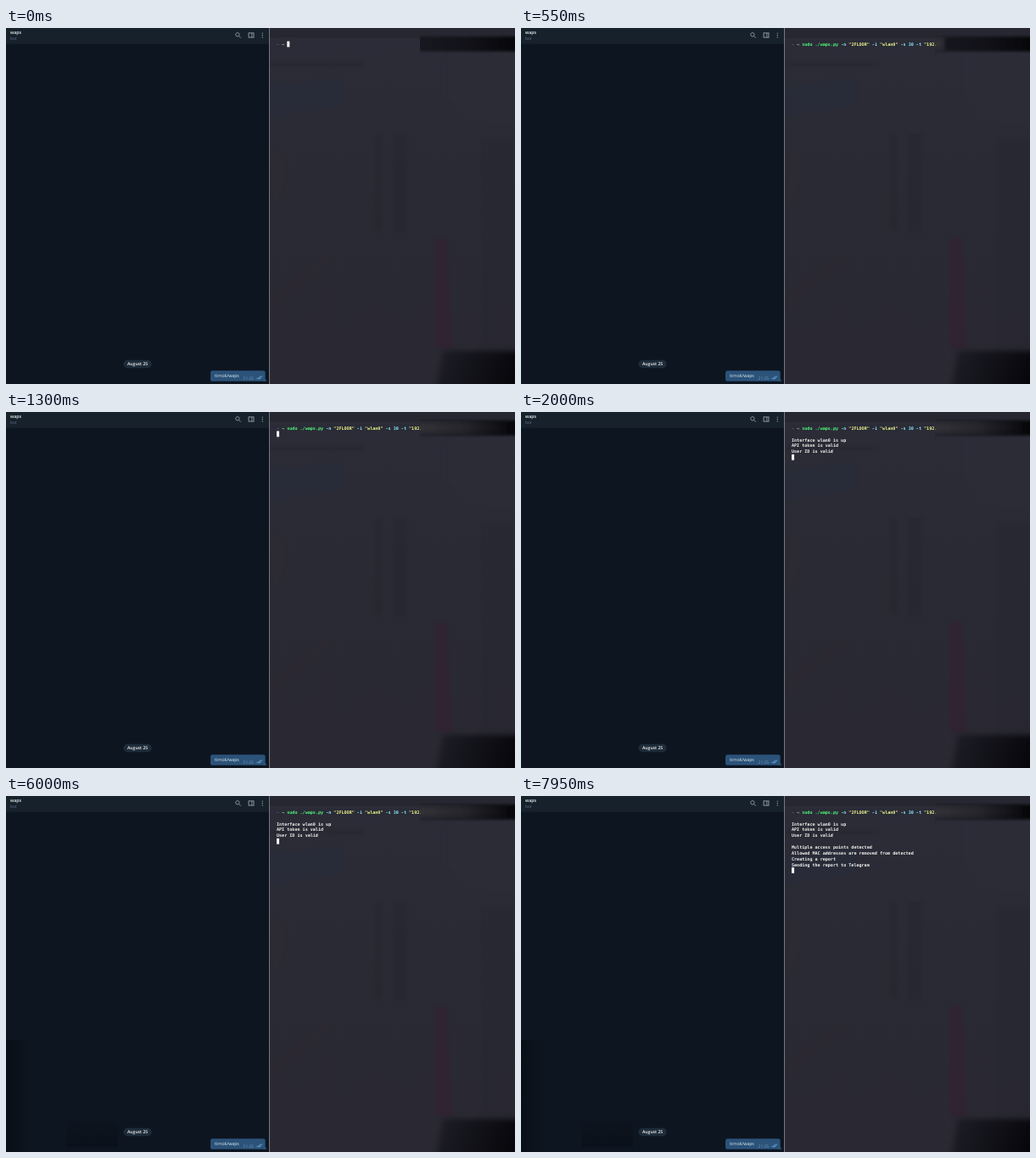
An HTML page with a canvas that plays this animation: 600x419 px, repeating every 8 s.

```html
<!DOCTYPE html>
<html lang="en">
<head>
<meta charset="utf-8">
<title>Chat and terminal</title>
<style>
html, body { margin: 0; width: 100%; height: 100%; overflow: hidden; background: #0d1520; }
canvas { display: block; width: 600px; height: 419px; }
</style>
</head>
<body>
<canvas id="stage"></canvas>
<script>
const W = 600, H = 419, LOOP = 8000, STEP = 50;
const SANS = '"Open Sans", "Noto Sans", sans-serif';
const MONO = 'bold 5.08px "DejaVu Sans Mono", "Noto Sans Mono", monospace';
const CELL = 3.06, ROW = 6.85, TERM_X = 319, TERM_Y = 19, EDGE = 488;
const CHARS_PER_STEP = 5, CMD_LENGTH = 85;

const canvas = document.getElementById('stage');
const ratio = window.devicePixelRatio || 1;
canvas.width = W * ratio;
canvas.height = H * ratio;
const ctx = canvas.getContext('2d');
ctx.scale(ratio, ratio);
ctx.textRendering = 'geometricPrecision';

const GREEN = '#50fa7b', CYAN = '#8be9fd', YELLOW = '#f1fa8c', WHITE = '#f4f4f0';
const COMMAND = [
  ['sudo ./waps.py ', GREEN], ['-n ', CYAN], ['"2FLOOR" ', YELLOW], ['-i ', CYAN],
  ['"wlan0" ', YELLOW], ['-s 30 -t ', CYAN], ['"192.', YELLOW]
];
const CHECKS = ['Interface wlan0 is up', 'API token is valid', 'User ID is valid'];
const REPORT = [
  'Multiple access points detected',
  'Allowed MAC addresses are removed from detected',
  'Creating a report',
  'Sending the report to Telegram'
];

function rect(x, y, w, h, fill) {
  ctx.fillStyle = fill;
  ctx.fillRect(x, y, w, h);
}

function round(x, y, w, h, r, fill) {
  ctx.fillStyle = fill;
  ctx.beginPath();
  ctx.roundRect(x, y, w, h, r);
  ctx.fill();
}

function poly(points, fill) {
  ctx.fillStyle = fill;
  ctx.beginPath();
  points.forEach(([x, y]) => ctx.lineTo(x, y));
  ctx.closePath();
  ctx.fill();
}

function line(points, color, width) {
  ctx.strokeStyle = color;
  ctx.lineWidth = width;
  ctx.beginPath();
  points.forEach(([x, y], i) => i ? ctx.lineTo(x, y) : ctx.moveTo(x, y));
  ctx.stroke();
}

function fade(x0, y0, x1, y1, ...colors) {
  const g = ctx.createLinearGradient(x0, y0, x1, y1);
  colors.forEach((c, i) => g.addColorStop(i / (colors.length - 1), c));
  return g;
}

function text(str, x, y, font, color, align = 'left') {
  ctx.font = font;
  ctx.fillStyle = color;
  ctx.textAlign = align;
  ctx.fillText(str, x, y);
}

function blurred(px, draw) {
  ctx.save();
  ctx.filter = `blur(${px * ratio}px)`;
  draw();
  ctx.restore();
}

function header() {
  rect(0, 0, 310, 18.7, '#17212b');
  text('waps', 5, 6.6, `600 5.2px ${SANS}`, '#f2f5f7');
  text('bot', 5, 14.2, `4.8px ${SANS}`, '#62727f');
  const gray = '#8a97a2';
  ctx.strokeStyle = gray;
  ctx.lineWidth = 0.9;
  ctx.beginPath();
  ctx.arc(272.9, 7.8, 2.2, 0, Math.PI * 2);
  ctx.stroke();
  line([[274.5, 9.4], [276.8, 11.7]], gray, 1);
  ctx.strokeRect(286.1, 5.9, 5.9, 5.2);
  line([[289.8, 5.9], [289.8, 11.1]], gray, 0.9);
  for (let i = 0; i < 3; i++) round(301.6, 5.4 + i * 2.4, 1.4, 1.4, 0.7, gray);
}

function chat(t) {
  rect(0, 0, 310, H, '#0d1520');
  const shade = t >= 4050 ? 0.55 : t >= 4000 ? 0.4 : 0;
  if (shade) {
    ctx.globalAlpha = shade;
    rect(0, 287, 30, 132, fade(0, 0, 30, 0, '#060a11', 'rgba(6,10,17,0)'));
    rect(72, 380, 60, 33, fade(0, 380, 0, 413, 'rgba(6,10,17,0)', '#080d14'));
    ctx.globalAlpha = 1;
  }
  header();

  round(138.5, 390.8, 33.2, 9.4, 4.7, '#1e2c39');
  text('August 25', 155.1, 397.3, `600 5.1px ${SANS}`, '#f1f4f6', 'center');

  const blue = '#2b5278';
  round(241, 403.2, 64.7, 12.6, [2.6, 2.6, 0, 2.6], blue);
  poly([[305, 411], [305.7, 413.5], [307.6, 415.8], [303, 415.8]], blue);
  text('tirnok/waps', 246, 411.4, `5.2px ${SANS}`, '#e8eff5');
  text('21:25', 279.6, 413.6, `4.9px ${SANS}`, '#719cc3');
  const tick = '#79bdf0';
  line([[295.4, 411.7], [296.9, 413.2], [300.2, 409.5]], tick, 0.8);
  line([[298.2, 412.6], [298.8, 413.2], [302.1, 409.5]], tick, 0.8);
}

function wallpaper() {
  rect(310, 0, 290, H, fade(0, 0, 0, H, '#2b2c37', '#2a2a34', '#2a2933'));
  rect(311, 0, 289, 10, 'rgba(28,29,38,.3)');
  line([[311, 10.6], [488, 10.6]], 'rgba(20,21,28,.35)', 0.8);
  blurred(1.5, () => {
    poly([[311, 68], [395, 60], [395, 92], [311, 104]], 'rgba(36,48,66,.2)');
    rect(311, 40, 110, 5, 'rgba(25,28,40,.18)');
    poly([[522, 28], [600, 28], [600, 116], [540, 108], [522, 82]], 'rgba(52,52,65,.16)');
    rect(435, 125, 8, 113, 'rgba(30,30,40,.17)');
    rect(456, 125, 17, 115, 'rgba(32,31,41,.17)');
    poly([[313, 147], [329, 147], [329, 178], [319, 208], [313, 208]], 'rgba(57,40,52,.14)');
    poly([[312, 320], [378, 267], [380, 274], [312, 328]], 'rgba(61,39,52,.16)');
    poly([[506, 247], [520, 247], [526, 377], [505, 377]], 'rgba(65,22,48,.28)');
    rect(560, 130, 40, 245, 'rgba(34,33,43,.15)');
  });
  blurred(3, () => poly([[515, 380], [606, 380], [606, 425], [507, 425]],
    fade(508, 380, 600, 412, 'rgba(21,21,29,.55)', 'rgba(14,14,20,.85)', '#07070b')));
  rect(310, 0, 1, H, '#77797d');
}

// Soft redaction strip; text beneath it only shows as a glow.
function strip(typed, inverse) {
  ctx.save();
  ctx.beginPath();
  ctx.rect(EDGE, 8, W - EDGE, 24);
  ctx.clip();
  const end = Math.min(591, TERM_X + (4 + typed) * CELL);
  const filled = Math.max(0, (end - EDGE) / (591 - EDGE));
  blurred(1.4, () => {
    rect(EDGE - 4, 10, 120, 17.5,
      fade(EDGE, 0, W, 0, 'rgba(20,20,27,.85)', 'rgba(15,15,21,.9)', '#07070a'));
    if (filled > 0) {
      rect(EDGE - 4, 10, end - EDGE + 4, 17.5,
        fade(EDGE, 0, 592, 0, 'rgba(43,43,52,.9)', 'rgba(38,38,46,.75)', 'rgba(22,22,28,.2)'));
    }
  });
  if (filled > 0) {
    blurred(2.5, () => rect(EDGE - 3, 14, end - EDGE, inverse ? 11 : 8, inverse
      ? fade(EDGE, 0, 592, 0, 'rgba(180,180,184,.28)', 'rgba(150,150,155,.17)', 'rgba(100,100,105,.1)')
      : fade(EDGE, 0, 592, 0, 'rgba(150,150,110,.1)', 'rgba(120,120,95,.02)')));
  }
  ctx.restore();
}

function rowText(str, row, col, color) {
  text(str, TERM_X + col * CELL, TERM_Y + row * ROW + 1.9, MONO, color);
}

function cursor(row, col) {
  rect(TERM_X + col * CELL, TERM_Y + row * ROW - 3.4, CELL, 6.8, '#f8f8f2');
}

function command(typed, inverse) {
  rowText('~', 0, 0, '#53657a');
  rowText('→', 0, 2, '#a9b98c');
  ctx.save();
  ctx.beginPath();
  ctx.rect(TERM_X, 8, EDGE + 0.6 - TERM_X, 24);
  ctx.clip();
  if (inverse) rect(TERM_X + 4 * CELL, TERM_Y - 3.4, EDGE - TERM_X, 6.8, '#f8f8f2');
  let at = 0;
  for (const [part, color] of COMMAND) {
    const shown = part.slice(0, Math.max(0, typed - at));
    rowText(shown, 0, 4 + at, inverse ? '#24252f' : color);
    at += part.length;
  }
  ctx.restore();
}

function terminal(t) {
  wallpaper();
  const typed = Math.min(CMD_LENGTH, t / STEP * CHARS_PER_STEP);
  const inverse = t >= 1200 && t < 1300;
  strip(typed, inverse);
  command(typed, inverse);

  if (t < 1200) {
    if (TERM_X + (4 + typed) * CELL < EDGE) cursor(0, 4 + typed);
    return;
  }
  const checked = t >= 1750, reported = t >= 7950;
  if (checked) CHECKS.forEach((s, i) => rowText(s, 2 + i, 0, WHITE));
  if (reported) REPORT.forEach((s, i) => rowText(s, 6 + i, 0, WHITE));
  cursor(reported ? 10 : checked ? 5 : t >= 1350 ? 2 : 1, 0);
}

function draw(t) {
  chat(t);
  terminal(t);
}

function frame() {
  const t = performance.now() % LOOP;
  draw(Math.floor(t / STEP) * STEP);
  requestAnimationFrame(frame);
}
frame();
</script>
</body>
</html>
```
